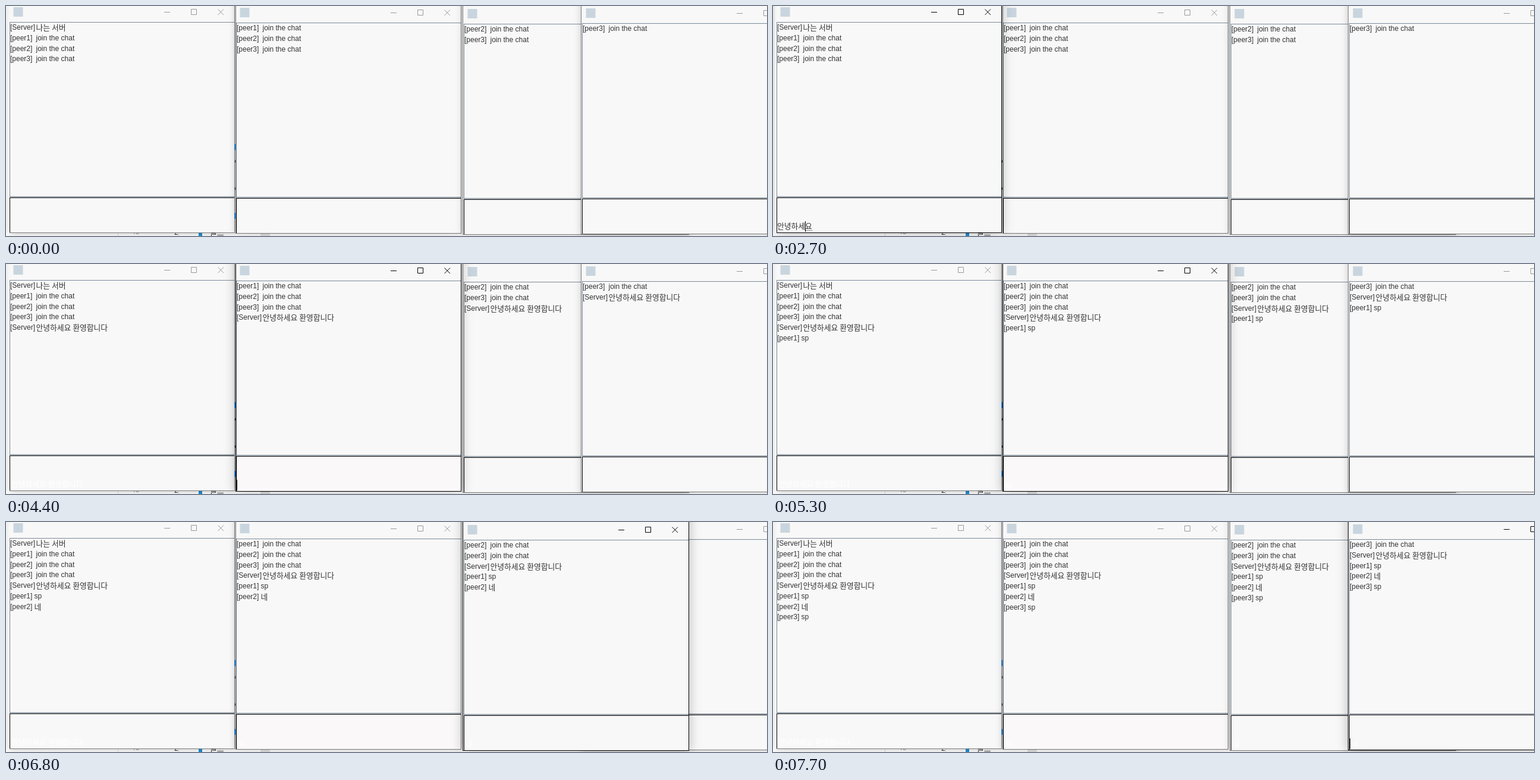
Animation of 1280 by 388 pixels, one loop 8 s. Source, as an HTML page with a canvas:

```html
<!DOCTYPE html>
<html lang="ko">
<head>
<meta charset="utf-8">
<title>Chat windows</title>
<style>
  html, body { margin: 0; width: 100%; height: 100%; overflow: hidden; background: #fff; }
  canvas { display: block; width: 1280px; height: 388px; }
</style>
</head>
<body>
<canvas id="stage" width="1280" height="388"></canvas>
<script>
const ctx = document.getElementById('stage').getContext('2d');
const LOOP = 8000;
const LATIN = '12px "Liberation Sans", Arial, sans-serif';
const HANGUL = '300 12.8px "Noto Sans CJK KR", "Noto Sans CJK", sans-serif';
const PANEL = '#f8f8f8';
const INK = '#333';

// left: outer border; dx, dy: shift of the contents against the first window
const windows = [
  { left: 5, dx: 0, dy: 0, active: [600, 4400], ghost: [3800, '안녕하세요 환영합니다'] },
  { left: 386, dx: 381, dy: 1, active: [4400, 5800], ghost: [4900, 'sp'] },
  { left: 768, dx: 764, dy: 3, active: [5700, 7100], ghost: [6400, '네'] },
  { left: 967, dx: 963, dy: 2, active: [7100, LOOP], ghost: [7700, 'sp'] }
];

// Each window sees the log from its own join line on
const log = [
  [0, '[Server]', '나는 서버'],
  [0, '[peer1]', 'join the chat'],
  [0, '[peer2]', 'join the chat'],
  [0, '[peer3]', 'join the chat'],
  [3800, '[Server]', '안녕하세요 환영합니다'],
  [4900, '[peer1]', 'sp'],
  [6400, '[peer2]', '네'],
  [7700, '[peer3]', 'sp']
];

// time, committed text, syllable being composed
const typing = [
  [0, '', ''],
  [1500, '', 'ㅇ'], [1900, '', '아'], [2000, '', '안'], [2100, '안', 'ㄴ'], [2200, '안', '녀'],
  [2400, '안', '녕'], [2500, '안녕', '하'], [2600, '안녕하', '세'], [2700, '안녕하세', '요'],
  [2900, '안녕하세요 ', ''], [3000, '안녕하세요 ', 'ㅎ'], [3100, '안녕하세요 ', '화'],
  [3200, '안녕하세요 ', '환'], [3300, '안녕하세요 환', '여'], [3400, '안녕하세요 환영', '하'],
  [3500, '안녕하세요 환영', '합'], [3600, '안녕하세요 환영합', '니'], [3700, '안녕하세요 환영합니', '다'],
  [3800, '', ''],
  [4700, 's', ''], [4800, 'sp', ''], [4900, '', ''],
  [6200, '', 'ㄴ'], [6300, '', '네'], [6400, '', ''],
  [7500, 's', ''], [7600, 'sp', ''], [7700, '', '']
];
const caretOff = [[1000, 1500], [4200, 4400], [5300, 5700], [6800, 7100]];

const within = (t, [from, to]) => t >= from && t < to;
const isHangul = s => /[\u3131-\ud7a3]/.test(s);

function box(x, y, w, h, color) {
  ctx.fillStyle = color;
  ctx.fillRect(x, y, w, h);
}

function text(s, x, y, color = INK) {
  ctx.font = isHangul(s) ? HANGUL : LATIN;
  ctx.fillStyle = color;
  ctx.fillText(s, x, y);
  return ctx.measureText(s).width;
}

function desktop() {
  box(0, 0, 1280, 388, '#fff');
  box(188, 380, 1, 8, '#ddd');
  box(290, 380, 1, 8, '#ddd');
  text('40', 211, 385, '#999');
  text('2', 283, 386);
  box(324, 380, 6, 8, '#1e8fd8');
  text('글쓰', 343, 387);
  box(428, 380, 16, 8, '#e2e2e2');
}

// Bits of the editor that show in the gap beside the first window
function gapMarks(covered) {
  for (const y of [260, 306]) box(385, y, 1, 4, '#444');
  if (covered) return;
  for (const y of [233, 349]) box(384, y, 2, 10, '#1478d4');
}

function frame(w, active) {
  const width = w.dx + 385 - w.left;
  const height = w.dy + 403;
  ctx.save();
  ctx.shadowColor = active ? 'rgba(0,0,0,.27)' : 'rgba(0,0,0,.2)';
  ctx.shadowBlur = active ? 18 : 12;
  ctx.shadowOffsetY = 2;
  box(w.left, -20, width, height, active ? '#000' : '#7c7c7c');
  ctx.restore();
  box(w.left + 1, -19, width - 2, height - 2, PANEL);
}

function caption(active) {
  box(12.5, 2, 16, 16, '#c9d5de');
  ctx.strokeStyle = active ? '#000' : '#999';
  ctx.lineWidth = 1;
  ctx.beginPath();
  ctx.moveTo(266, 10.5);
  ctx.lineTo(276, 10.5);
  ctx.rect(311.5, 5.5, 9, 9);
  ctx.moveTo(356.5, 5.5);
  ctx.lineTo(366, 15);
  ctx.moveTo(366, 5.5);
  ctx.lineTo(356.5, 15);
  ctx.stroke();
}

function panes(tinted) {
  box(6, 27, 378, 1, '#7a8a99');
  box(6, 27, 1, 295, '#7a8a99');
  box(6, 321, 378, 1, '#7a8a99');
  box(6, 322, 378, 1, '#c8cdd2');
  if (tinted) box(7, 324, 377, 58, '#fbf8fa');
  box(6, 323, 378, 1, '#000');
  box(6, 323, 1, 59, '#000');
}

function messages(lines) {
  lines.forEach(([, name, body], i) => {
    const y = Math.round(40 + 17.75 * i);
    text(name, 7, y);
    const x = name === '[Server]' || body.startsWith('join') ? 50.5 : 47.5;
    text(body, x, isHangul(body) ? y + 1 : y);
  });
}

function input(t) {
  const [, done, composing] = typing.findLast(step => t >= step[0]);
  const caret = 7 + (done ? text(done, 7, 376) : 0);
  if (composing) {
    const end = caret + text(composing, caret, 376);
    for (let x = Math.round(caret) + 1; x < end; x += 2) box(x, 378, 1, 1, INK);
  }
  if (!caretOff.some(span => within(t, span))) box(Math.round(caret), 363, 1, 18, '#000');
}

function drawWindow(w, index, t, focused) {
  const active = within(t, w.active);
  frame(w, active);
  // The first window's outer edge blends into the white desktop
  if (index === 0) box(3, 0, 3, 383, '#f4f4f4');
  ctx.save();
  ctx.translate(w.dx, w.dy);
  caption(active);
  panes(index === 1 && t >= 4400);
  messages(log.slice(index).filter(line => t >= line[0]));
  if (t >= w.ghost[0]) text(w.ghost[1], 9, 376, '#fff');
  if (focused) input(t);
  ctx.restore();
}

function draw(t) {
  desktop();
  // The window activated last lies on top
  const raised = w => t >= w.active[0] ? w.active[0] : 0;
  const order = [0, 1, 2, 3].sort((a, b) => raised(windows[a]) - raised(windows[b]) || a - b);
  for (const i of order) drawWindow(windows[i], i, t, i === order[3] && t >= 600);
  gapMarks(within(t, windows[0].active));
}

const start = performance.now();
function tick() {
  draw((performance.now() - start) % LOOP);
  requestAnimationFrame(tick);
}
tick();
</script>
</body>
</html>
```
